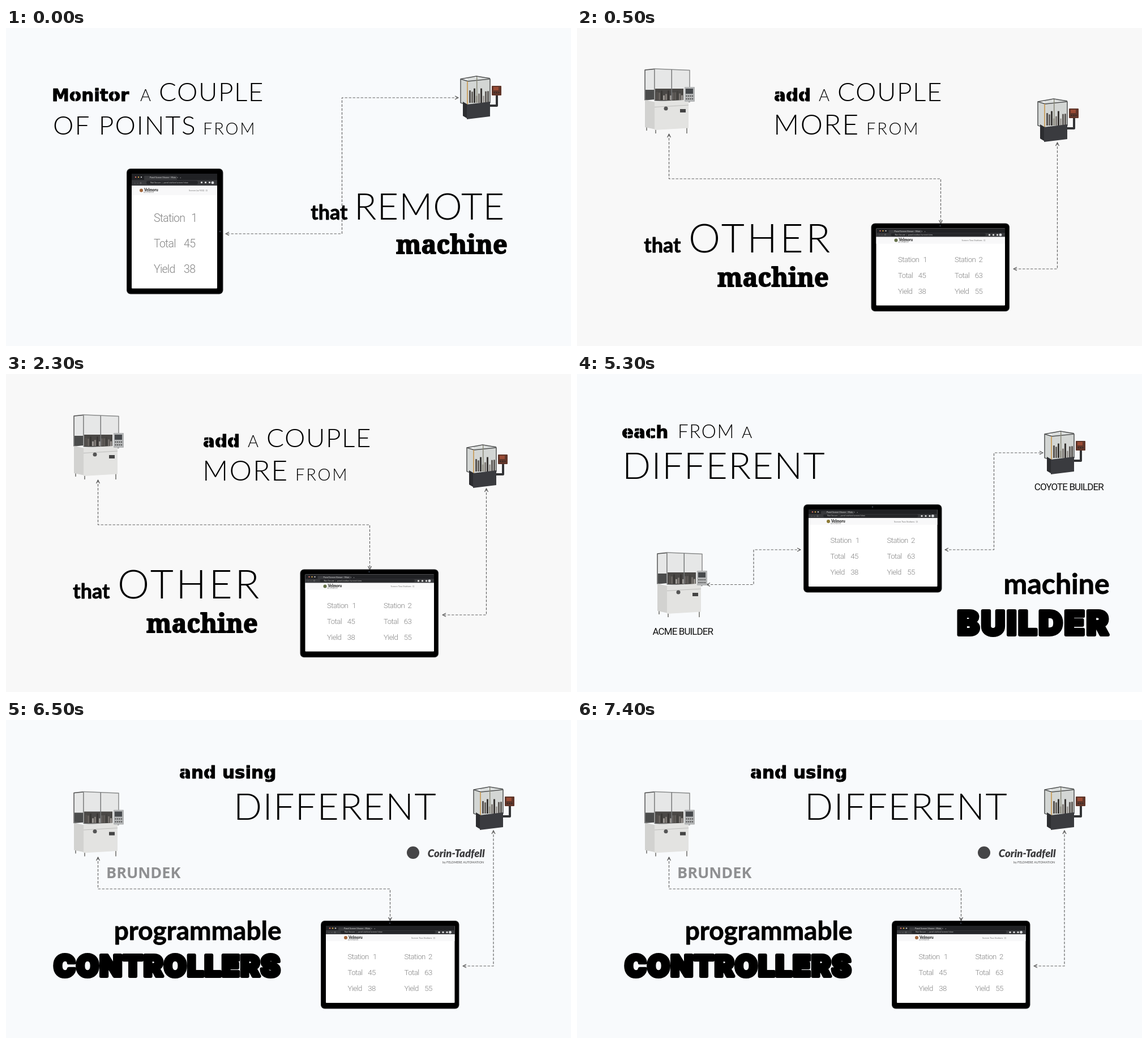
Write an HTML page with a canvas that moves like this. It is 998 px wide and 561 px high and loops after 8 s.

```html
<!DOCTYPE html>
<html lang="en">
<head>
<meta charset="utf-8">
<title>Remote machine monitoring</title>
<style>
  html, body { margin: 0; height: 100%; overflow: hidden; background: #f8fafc; }
  canvas { display: block; }
</style>
</head>
<body>
<canvas id="stage" width="998" height="561"></canvas>
<script>
const ctx = document.getElementById('stage').getContext('2d');
const LOOP = 8000;
let paper;

// ---------- basic shapes ----------
function rect(x, y, w, h, color, radius = 0) {
  ctx.fillStyle = color;
  ctx.beginPath();
  ctx.roundRect(x, y, w, h, radius);
  ctx.fill();
}

function dot(x, y, r, color) {
  rect(x - r, y - r, r * 2, r * 2, color, r);
}

function line(color, width, ...points) {
  ctx.beginPath();
  points.forEach(([x, y]) => ctx.lineTo(x, y));
  ctx.strokeStyle = color;
  ctx.lineWidth = width;
  ctx.stroke();
}

function at(x, y, draw, slope = 0) {
  ctx.save();
  ctx.transform(1, slope, 0, 1, x, y);
  draw();
  ctx.restore();
}

// Rectangle with upright sides and sloping top and bottom.
function panel(x, y, w, h, slope, fill, edge) {
  at(x, y, () => {
    rect(0, 0, w, h, fill);
    if (!edge) return;
    ctx.strokeStyle = edge;
    ctx.lineWidth = 1.5;
    ctx.strokeRect(0, 0, w, h);
  }, slope);
}

// Clutter of small machine parts standing on one floor.
function parts(x, floor, w, height) {
  const count = Math.round(w / 4);
  for (let i = 0; i < count; i++) {
    const noise = Math.abs(Math.sin(i * 12.9 + 2) * 43.7) % 1;
    const h = height * (0.4 + 0.6 * noise);
    rect(x + i * 4, floor - h, 3, h, `hsl(30 4% ${20 + 45 * (1 - noise)}%)`);
  }
}

// ---------- lettering ----------
// Places the ink of the text, not its advance box, at x.
function label(text, x, y, font, { spacing = 0, color = '#000', align = 'left', stroke = 0 } = {}) {
  ctx.font = font;
  ctx.letterSpacing = spacing + 'px';
  ctx.textAlign = align;
  const { actualBoundingBoxLeft: l, actualBoundingBoxRight: r } = ctx.measureText(text);
  const inkX = x + (align === 'left' ? l : align === 'right' ? -r : (l - r) / 2);
  ctx.fillStyle = ctx.strokeStyle = color;
  ctx.fillText(text, inkX, y);
  if (stroke) {
    ctx.lineWidth = stroke;
    ctx.lineJoin = 'round';
    ctx.strokeText(text, inkX, y);
  }
  return inkX;
}

const thin = (text, x, y, size, spacing = 0) =>
  label(text, x, y, `300 ${size}px Lato, sans-serif`, { spacing });

const hand = (text, x, y, size) =>
  label(text, x, y, `700 ${size}px Lato, sans-serif`, { align: 'right', stroke: 0.8 });

const slab = (text, x, y) =>
  label(text, x, y, '700 45px "Noto Serif", serif', { align: 'right', stroke: 1.8 });

const deco = (text, x, y, size, spacing) =>
  label(text, x, y, `900 ${size}px Inter, sans-serif`, { align: 'right', spacing, stroke: 6 });

const caption = (text, x, y) =>
  label(text, x, y, '400 17px Roboto, sans-serif', { align: 'center', spacing: -0.9, color: '#111' });

const tiny = (text, x, y, size, color, weight = 400) =>
  label(text, x, y, `${weight} ${size}px Lato, sans-serif`, { color });

// Heavy letters with a narrow cut through the round ones.
function stencil(text, x, y) {
  const start = label(text, x, y, '700 31px "DejaVu Sans", sans-serif', { stroke: 1 });
  [...text].forEach((char, i) => {
    if (!'oadecg'.includes(char)) return;
    const before = ctx.measureText(text.slice(0, i)).width;
    const cut = start + before + ctx.measureText(char).width * 0.48;
    line(paper, 1.3, [cut, y - 19], [cut, y + 1]);
  });
}

function aCouple(x) {
  thin('A', x, 129, 29);
  thin('COUPLE', x + 35, 129, 46, 1.5);
}

function thatMachine(word, x, y, size, spacing, right) {
  hand('that', x, y, 36);
  thin(word, x + 17, y, size, spacing);
  slab('machine', right, y + 60);
}

// ---------- connectors ----------
function arrowHead([x, y], [fromX, fromY]) {
  ctx.save();
  ctx.translate(x, y);
  ctx.rotate(Math.atan2(y - fromY, x - fromX));
  line('#555', 1.2, [-6, -3], [0, 0], [-6, 3]);
  ctx.restore();
}

// Elbow line: turns halfway along x, halfway along y, or once at the corner.
function connector(x1, y1, x2, y2, turn) {
  const midX = (x1 + x2) / 2, midY = (y1 + y2) / 2;
  const bends = {
    x: [[midX, y1], [midX, y2]],
    y: [[x1, midY], [x2, midY]],
    corner: [[x1, y2]],
  }[turn];
  ctx.setLineDash([4.5, 2.5]);
  line('#666', 1.2, [x1, y1], ...bends, [x2, y2]);
  ctx.setLineDash([]);
  arrowHead([x1, y1], bends[0]);
  arrowHead([x2, y2], bends.at(-1));
}

// ---------- machines ----------
function whiteMachine(x, y) {
  at(x, y, () => {
    // cabinet: closed doors above, dark windows below
    panel(2, 4, 17, 53, -0.1, '#e6e7e7', '#555');
    panel(19, 2, 62, 56, 0.04, '#e6e7e7', '#8a8c8c');
    panel(3, 39, 15, 17, 0, '#4b4c4c');
    rect(20, 37, 50, 21, '#4a4846');
    parts(22, 57, 46, 17);
    rect(48.5, 3, 1.5, 55, '#77797a');
    // base on three feet
    [4, 20, 75].forEach((foot, i) => rect(foot, 102, 2, i ? 14 : 9, '#8d8d8b'));
    panel(2, 57, 17, 48, 0.2, '#d2d2d0');
    panel(19, 60, 60, 50, -0.06, '#e3e3e1');
    panel(19, 69, 60, 1, -0.06, '#bcbcba');
    dot(39, 72, 3.5, '#555');
    rect(64, 73, 10, 6, '#444');
    // control panel
    rect(72, 34, 18, 26, '#b3b5b6', 1);
    rect(74, 37, 13, 9, '#46494c');
    for (let i = 0; i < 8; i++) dot(75.5 + (i % 4) * 3.5, 50 + (i >> 2) * 5, 1.2, '#555');
  });
}

function darkMachine(x, y) {
  at(x, y, () => {
    // glazed cage
    rect(14, 3, 39, 8, '#dcdfde');
    panel(2, 6, 12, 42, 0.3, '#d3d6d4', '#505252');
    panel(14, 10, 40, 42, -0.1, '#d3d6d4', '#505252');
    line('#505252', 1.6, [2, 6], [30, 1], [54, 5]);
    parts(17, 48, 36, 26);
    rect(13, 10, 2, 41, '#c9a368');
    rect(30, 2, 1.4, 46, '#858574');
    // base
    panel(6, 46, 8, 25, 0.6, '#2c2d30');
    panel(13, 51, 41, 26, -0.12, '#3a3b3f');
    // operator box on its arm
    line('#333436', 4, [66, 33], [66, 53], [54, 53]);
    rect(57, 18, 17, 17, '#60362a', 1);
    rect(60, 20, 9, 6, '#9a4b35');
    for (let i = 0; i < 3; i++) dot(61.5 + i * 4, 30, 1.1, '#282828');
  });
}

// ---------- tablets ----------
function reading(name, value, x, y, size) {
  const font = `300 ${size}px Roboto, sans-serif`;
  const style = { color: '#858585', spacing: -size * 0.04 };
  label(name, x, y, font, style);
  label(value, x + size * 3.75, y, font, { ...style, align: 'right' });
}

function station(number, total, made, x, y, step, size) {
  reading('Station', number, x, y, size);
  reading('Total', total, x, y + step, size);
  reading('Yield', made, x, y + step * 2, size);
}

// Browser window: tab strip, address bar and page header.
function browser(x, y, w, h, bar, logoX, noteX, note, mark) {
  at(x, y, () => {
    rect(0, 0, w, h, '#fff', 1);
    rect(0, 0, w, bar, '#202124');
    rect(22, bar * 0.18, 58, bar * 0.35, '#38393c', 1);
    rect(0, bar * 0.53, w, bar * 0.47, '#38393c');
    ['#e5796d', '#e2b24f', '#cdcdcd'].forEach((c, i) => dot(7 + i * 5, bar * 0.29, 1.2, c));
    tiny('Panel Screen Viewer - Main  ×   +', 32, bar * 0.4, 3.8, '#ddd');
    rect(26, bar * 0.59, w - 60, bar * 0.32, '#242528', 3);
    tiny('‹   ›   ○', 5, bar * 0.84, 4.5, '#aaa');
    tiny('Not Secure  |  panel.station/screen/view', 33, bar * 0.83, 3.8, '#bbb');
    for (let i = 0; i < 3; i++) rect(w - 29 + i * 7, bar * 0.67, 3, 3, '#ddd', 1);
    dot(w - 8, bar * 0.76, 2.4, '#d5d7da');
    rect(0, bar, w, bar * 0.8, '#f8f8f9');
    const mid = bar * 1.4;
    dot(logoX + 3, mid, 3, mark);
    tiny('Velmoru', logoX + 7, mid + 1.5, 6.5, '#333', 900);
    tiny('AUTOMATION', logoX + 7, mid + 4.8, 2.7, '#888');
    tiny(note, noteX, mid + 1.5, 4.1, '#777');
  });
}

function tabletBody(w, h) {
  rect(0, 0, w, h, '#2a2b2c', 7);
  rect(1, 1, w - 2, h - 2, '#000', 6);
}

function portraitTablet(x, y) {
  at(x, y, () => {
    tabletBody(170.5, 221.5);
    browser(9, 9, 151, 202.5, 21, 14, 101, 'Screen (w/502)  ⊡', '#a2673d');
    dot(165, 111, 1.2, '#343a48');
    station(1, 45, 38, 48, 93.5, 45, 19.5);
  });
}

function wideTablet(x, y, mark) {
  at(x, y, () => {
    tabletBody(244.5, 155.5);
    dot(122, 4.5, 1.2, '#343a48');
    browser(9, 9, 227.5, 136, 15, 32, 151, 'Screen Two Stations  ⊡', mark);
    station(1, 45, 38, 47.5, 68, 28.2, 13.2);
    station(2, 63, 55, 147.5, 68, 28.2, 13.2);
  });
}

// ---------- scenes ----------
function monitorScene() {
  stencil('Monitor', 83, 129);
  aCouple(237);
  thin('OF POINTS', 85, 188, 46, 2);
  thin('FROM', 351, 188, 29, 2.8);
  connector(799, 123, 388, 363, 'x');
  darkMachine(801, 84);
  portraitTablet(213, 248);
  thatMachine('REMOTE', 604, 338, 65, 1, 884);
}

function addScene() {
  whiteMachine(118, 70);
  darkMachine(812, 124);
  stencil('add', 349, 129);
  aCouple(427);
  thin('MORE', 352, 188, 50, 2);
  thin('FROM', 514, 188, 29, 2.8);
  connector(162.5, 187, 642.5, 345, 'y');
  connector(848.5, 202, 771, 425, 'corner');
  thatMachine('OTHER', 184, 396, 71, 4.5, 443);
  wideTablet(519.5, 344.5, '#647048');
}

function builderScene() {
  stencil('each', 80, 113);
  thin('FROM', 181, 113, 33, 1.6);
  thin('A', 291, 113, 28);
  thin('DIFFERENT', 86, 185, 66, 1.4);
  connector(229, 371.5, 395, 310, 'x');
  connector(650, 310, 823, 139, 'x');
  whiteMachine(140, 313);
  darkMachine(824, 100);
  caption('ACME BUILDER', 187.5, 460);
  caption('COYOTE BUILDER', 870, 205);
  wideTablet(400, 230, '#8d7a35');
  hand('machine', 940, 388, 50);
  deco('BUILDER', 938, 460, 58, 3.4);
}

function controllerScene() {
  stencil('and using', 307, 103);
  thin('DIFFERENT', 408, 176, 66, 1.4);
  whiteMachine(118, 124.5);
  darkMachine(824, 117);
  connector(162.5, 242, 678.5, 354, 'y');
  connector(861, 195, 807, 434, 'corner');
  label('BRUNDEK', 179, 279, '700 27px "Open Sans", sans-serif', { color: '#8f9092' });
  dot(719, 234, 11, '#454547');
  label('Corin-Tadfell', 846, 242, 'italic 900 18.5px Lato, sans-serif', { color: '#3c3c3e', align: 'right' });
  label('by FELDMERE AUTOMATION', 844, 253, '700 5.4px Lato, sans-serif', { color: '#777', align: 'right' });
  hand('programmable', 486, 388, 46);
  deco('CONTROLLERS', 483, 452, 51, 1.7);
  wideTablet(556, 354, '#a2673d');
}

const scenes = [
  { until: 500, paper: '#f8fafc', draw: monitorScene },
  { until: 3500, paper: '#f8f8f8', draw: addScene },
  { until: 6500, paper: '#f8fafc', draw: builderScene },
  { until: LOOP, paper: '#f8fafc', draw: controllerScene },
];

function render() {
  const time = performance.now() % LOOP;
  const scene = scenes.find(s => time < s.until);
  paper = scene.paper;
  rect(0, 0, 998, 561, paper);
  scene.draw();
  requestAnimationFrame(render);
}
render();
</script>
</body>
</html>
```
